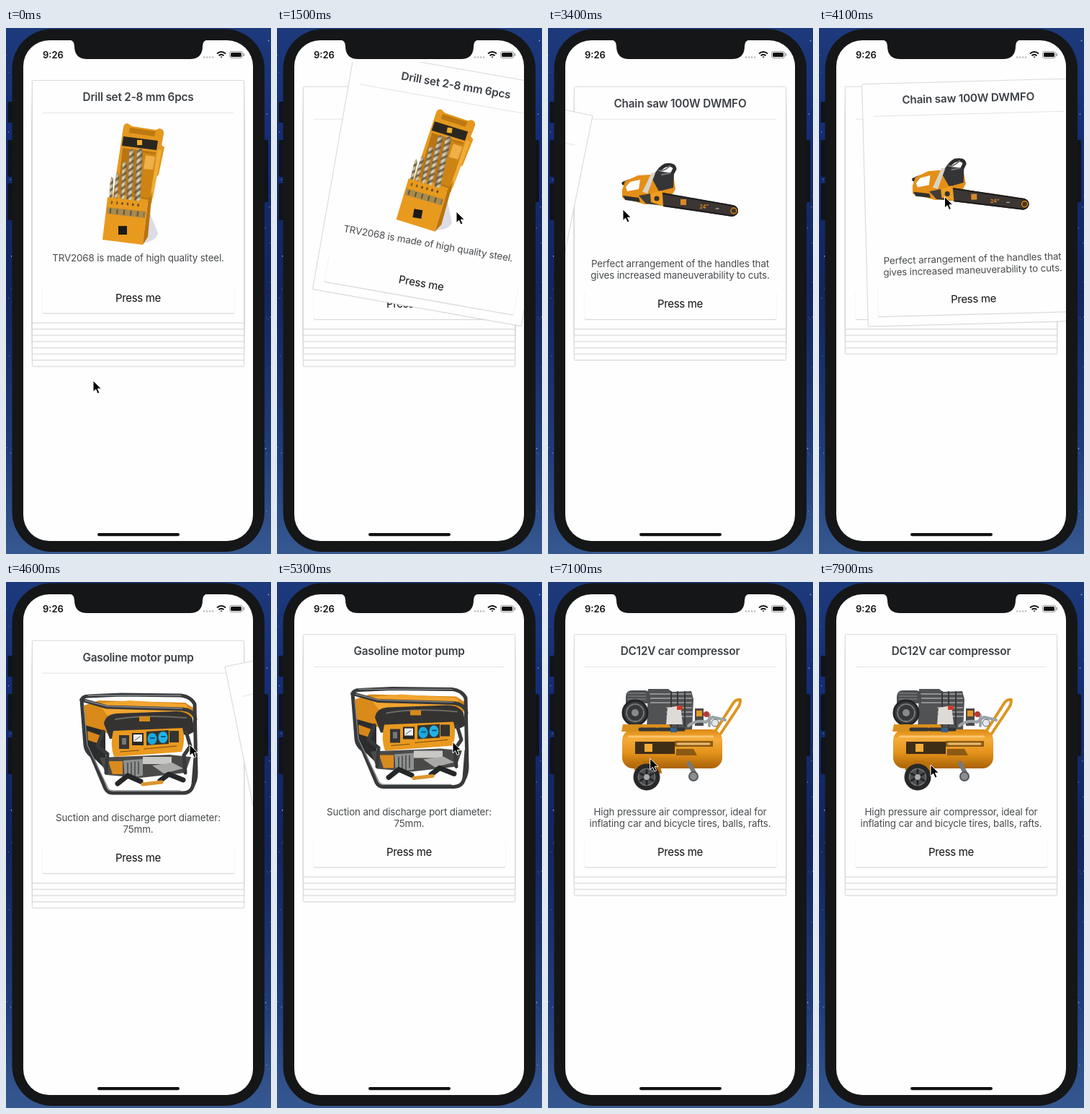
Recreate the animation shown at these times as an HTML page. Size 368 px wide and 728 px high, loop 8000 ms.

```html
<!DOCTYPE html>
<html lang="en">
<head>
<meta charset="utf-8">
<title>Card deck</title>
<style>
html, body { margin: 0; width: 100%; height: 100%; overflow: hidden; background: #12286a; }
svg { display: block; }
text { font-family: Inter, Roboto, sans-serif; text-anchor: middle; }
.title { font-size: 15.3px; font-weight: 600; letter-spacing: -.2px; fill: #3c4045; }
.body { font-size: 13.4px; letter-spacing: -.15px; fill: #484b4e; }
.press { font-size: 15px; letter-spacing: -.33px; fill: #111; }
.time { font-size: 13px; font-weight: 600; fill: #111; text-anchor: start; }
.tiny { font-size: 5px; font-weight: 700; fill: #222; }
.line { fill: none; stroke-linecap: round; stroke-linejoin: round; }
</style>
</head>
<body>
<svg width="368" height="728" viewBox="0 0 368 728">
  <defs>
    <linearGradient id="sky" x2="0" y2="1">
      <stop offset="0" stop-color="#1d3a7c"/>
      <stop offset=".2" stop-color="#142d74"/>
      <stop offset=".5" stop-color="#12255e"/>
      <stop offset=".8" stop-color="#1f3c7a"/>
      <stop offset="1" stop-color="#365890"/>
    </linearGradient>
    <linearGradient id="tank" x2="0" y2="1">
      <stop offset="0" stop-color="#dc8a12"/>
      <stop offset=".25" stop-color="#f5ab3a"/>
      <stop offset=".6" stop-color="#e3921a"/>
      <stop offset="1" stop-color="#a96208"/>
    </linearGradient>
    <linearGradient id="steel">
      <stop offset="0" stop-color="#6b5d45"/>
      <stop offset=".45" stop-color="#ded3ba"/>
      <stop offset="1" stop-color="#87754f"/>
    </linearGradient>
    <pattern id="twist" width="8" height="9" patternUnits="userSpaceOnUse" patternTransform="skewY(-35)">
      <path d="M0 0h8v4h-8z" fill="#5b4d35" opacity=".75"/>
    </pattern>
    <clipPath id="view"><path d="M24 47h319v626a36 36 0 0 1-36 36H60a36 36 0 0 1-36-36z"/></clipPath>

    <g id="drills">
      <path d="M187 298l12-44 12 30q-2 10-20 14z" fill="#dcdce6"/>
      <path d="M163 137q1-5 6-5l6 4 33 5 5-2q7 1 6 8l-3 15 4 3-8 38-4 4-6 36-54-7z" fill="#e4981f"/>
      <path d="M172 138l36 5-2 7-35-5z" fill="#bd790f"/>
      <path d="M163 150l48 6-2 13-48-6z" fill="#2b2720"/>
      <path d="M182 155h7v7h-7z" fill="#f3b02c"/>
      <path d="M162 166l46 6-9 66-44-8z" fill="#b97512"/>
      <path d="M189 172l19 3-7 61-18-3z" fill="#cd8413"/>
      <path d="M194 176l13 2-3 18-13-1z" fill="#efb04a"/>
      <path d="M211 168l5 1-12 67-4-2z" fill="#f0ad3b"/>
      <g id="bits"></g>
      <path d="M141 234l56 7-7 59-56-7z" fill="#e89a1f"/>
      <path d="M197 241l6-15-6 63-7 11z" fill="#b9730c"/>
      <path d="M141 248l53 6-1 9-53-6z" fill="#a98a4a"/>
      <path class="line" d="M144 253l48 5" stroke="#5e5340" stroke-width="7" stroke-dasharray="2 7.5" style="stroke-linecap:butt"/>
      <text class="tiny" x="165" y="245" transform="rotate(6 165 245)" style="word-spacing:3px">2 3 4 5 6 8</text>
      <path d="M156 274h12v12h-12z" fill="#1d1a15"/>
    </g>

    <g id="keys">
      <g id="wrenches" class="line"></g>
      <path fill-rule="evenodd" d="M148 167q1-12 12-12h38q12 0 13 12l-4 19-8 9h-37l-9-9zm8 2l3 12 9 5h22l9-5 4-12q-1-6-8-6h-31q-7 0-8 6z" fill="#f1a024"/>
      <path d="M153 190l52 0 3 20-13 66h-36l-12-66z" fill="#d9d7d4"/>
      <path d="M156 193l8 7v58l-6 14 37 1-6-15v-58l13-8" class="line" stroke="#aaa6a0" stroke-width="1.5"/>
      <path d="M159 261l-7 11q0 5 6 5h37q6 0 4-5l-8-11z" fill="#efa125"/>
      <path d="M166 267h22v10h-22z" fill="#dedcd8"/>
      <path d="M163 198h25v60h-25z" fill="#24201b"/>
      <path d="M166 212h19v29h-19z" fill="#e69a22"/>
      <path d="M170 216l11 20M181 216l-10 19" class="line" stroke="#3b3020" stroke-width="2"/>
      <path d="M172 201h7v7h-7z" fill="#e9ba62"/>
      <path d="M167 246h17M167 251h13" class="line" stroke="#cc9140"/>
      <path d="M260 164l-1 102" class="line" stroke="#92989d" stroke-width="7"/>
      <path d="M259 166l-1 99" class="line" stroke="#dde0e2" stroke-width="3"/>
      <g fill="#f8f8f8" stroke="#8b9094" stroke-width="3">
        <ellipse cx="260" cy="158" rx="5.5" ry="5"/><ellipse cx="258" cy="271" rx="5" ry="4.5"/>
      </g>
    </g>

    <g id="saw" transform="translate(0 -8.6)">
      <path d="M105 215q12-5 24-6M146 225q2-28 17-35 12-2 13 5l-7 13" class="line" stroke="#2c2c2d" stroke-width="5"/>
      <path d="M103 224l4-12 18-8 17-1 9 5 23-5 3 20-12 20-31 1-31-9z" fill="#e48f18"/>
      <path d="M108 220l6-7 14-3-2 13-16 3z" fill="#fff"/>
      <path d="M143 206l8-8 24 3-1 20-20 5z" fill="#353538"/>
      <path d="M126 232l28-5 6 19-24-3z" fill="#403c38"/>
      <path d="M104 232l22 3 2 6-21-3z" fill="#30302f"/>
      <path d="M131 227l13-27 5 1-11 28z" fill="#d9d3c7"/>
      <path d="M154 197q5 3 15-6M158 203l11-2" class="line" stroke="#77777b" stroke-width="2"/>
      <path d="M142 229l15-4 4 22-18-6z" fill="#ef9e20"/>
      <circle cx="151" cy="236" r="3.5" fill="#353331"/>
      <path d="M159 228l97 17q8 2 8 8t-8 8l-96-14z" fill="#3b3533"/>
      <path d="M160 229l97 17q6 2 6 7t-7 7l-95-14" class="line" stroke="#1d1b1a" stroke-width="2" stroke-dasharray="2 1.5"/>
      <circle cx="258" cy="253" r="4" fill="#453420" stroke="#d3821a" stroke-width="1.5"/>
      <path d="M184 237h8v8h-8z" fill="#d8892a"/>
      <text class="tiny" x="217" y="250" style="fill:#de8c24;font-size:7px">24"</text>
      <path d="M233 250h4" class="line" stroke="#d9d0c4"/>
    </g>

    <g id="pump" transform="translate(0 -8.6)">
      <path d="M105 172l24-8 120 3 12 8-4 28-112 8-34-12z" fill="#d98a18"/>
      <path d="M128 168l44-4 78 5 4 9-112 8z" fill="#f2a52f"/>
      <path d="M109 198l29 8v53l-27-26z" fill="#2b2c2d"/>
      <path d="M113 206l17 6v12l-16-5z" fill="#d6861a"/>
      <path d="M136 196q2-13 18-14l82-3q17 0 23 11l3 17-8 4-110 6z" fill="#343332"/>
      <path d="M152 190q40-7 98-2" class="line" stroke="#6c6963" stroke-width="2"/>
      <path d="M185 186h15v7h-15z" fill="#d68a1b"/>
      <path d="M149 206l96-4q5 15-1 33l-94 7q-6-16-1-36z" fill="#e9991f"/>
      <path d="M157 212h14v19h-14z" fill="#343536"/><path d="M161 216h6v9h-6z" fill="#777"/>
      <path d="M175 209h16v17h-16z" fill="#292929"/><path d="M177 211h12v10h-12z" fill="#eee"/>
      <path d="M179 219l7-5" class="line" stroke="#555"/>
      <path d="M195 207l31-2v19l-31 2zM227 206h13v16h-13z" fill="#353430"/>
      <ellipse cx="203" cy="217" rx="6.5" ry="8" fill="#18a9df"/>
      <ellipse cx="218" cy="215" rx="6.5" ry="8" fill="#20b3e6"/>
      <path d="M201 216h5M216 214h5" class="line" stroke="#075680" stroke-width="2"/>
      <path d="M159 235l25-2M192 231l45-4" class="line" stroke="#69420d" stroke-dasharray="2 1"/>
      <path d="M130 243l97-4 30 3-8 22-62 7-48-4z" fill="#4a4a48"/>
      <path d="M142 248h20v18h-14z" fill="#d98b20"/>
      <path d="M163 247l27-2v23l-25 4z" fill="#8f9190"/>
      <path d="M190 242h40v10h-40z" fill="#c9c8c4"/>
      <path d="M169 251v17M174 250v18M179 249v19M184 249v16" class="line" stroke="#575957" stroke-width="2"/>
      <path d="M203 254l28-4 15 8-27 7z" fill="#a9aaa8"/>
      <path d="M155 279l14-11 18 8M214 275l12-9 20 8" class="line" stroke="#252728" stroke-width="7"/>
      <path d="M190 280l26-3" class="line" stroke="#dc942c" stroke-width="5"/>
      <g class="line" stroke="#37393b" stroke-width="5">
        <path d="M105 163q2-5 9-5l46-2 83 1q14 2 19 12l2 95q0 10-4 17"/>
        <path d="M105 163l35 10 105 3q17 2 18 14"/>
        <path d="M105 163l5 63q1 9 9 15l19 45q3 6 10 6h97q13 0 15-12l3-38"/>
        <path d="M135 207l-8 20 14 11-2 26M250 207l6 20-9 13 2 24"/>
      </g>
      <path d="M114 157l129 0M110 164l31 8 104 3M108 172l5 54 28 58q2 5 9 5h92" class="line" stroke="#85898b" stroke-width="1.3"/>
    </g>

    <g id="compressor">
      <path d="M230 210l27-42q4-6 10-5 0 7-4 12l-24 36" class="line" stroke="#dc9521" stroke-width="4"/>
      <path d="M139 148h28l5 4 27-1 3 11-2 43h-63z" fill="#505254"/>
      <path d="M141 155h57M141 161h58M141 167h58M165 174h34M165 180h35M165 186h35" class="line" stroke="#8f9192" stroke-width="2"/>
      <path d="M171 152v48M180 152v48M190 152v48" class="line" stroke="#36383a" stroke-width="2"/>
      <path d="M108 159q0-9 9-9h18q7 0 7 10v8h-34z" fill="#4c4e50"/>
      <path d="M111 154h25M111 158h25M111 162h25" class="line" stroke="#8b8d8f"/>
      <circle cx="121" cy="181" r="17" fill="#37393b" stroke="#222426" stroke-width="3"/>
      <circle cx="121" cy="181" r="12" class="line" stroke="#777b7d" stroke-width="2" stroke-dasharray="6 2"/>
      <circle cx="121" cy="181" r="5" fill="#88898a"/>
      <path d="M166 174l18-3 3 26h-23z" fill="#dedbd7"/>
      <path d="M179 171h8v6h-8z" fill="#ca3d2c"/>
      <path d="M204 175h12v24h-12z" fill="#4b4948"/><path d="M206 178h8v8h-8z" fill="#e69825"/>
      <path d="M195 199q11-9 24-5l10-7 17 4M224 184v15" class="line" stroke="#9ca3a7" stroke-width="4"/>
      <circle cx="220" cy="183" r="4" fill="#b73a32"/><circle cx="232" cy="195" r="5" fill="#e6e7e8" stroke="#54616d"/>
      <rect x="103" y="204" width="139" height="54" rx="15" fill="url(#tank)"/>
      <path d="M104 197h64l5 10h-71z" fill="#d98f1c"/>
      <path d="M128 204h22M154 204h34" class="line" stroke="#343536" stroke-width="5"/>
      <path d="M170 202h9v6h-9z" fill="#38608a"/>
      <path d="M112 214h117" class="line" stroke="#fbc56c" stroke-width="3"/>
      <path d="M121 221h55v17h-55z" fill="#3f2e16"/>
      <path d="M134 224h11v11h-11z" fill="#f4ae38"/>
      <path d="M176 220h53v8h-53zM178 231h24l5 9h-29z" fill="#8c5a13"/>
      <path d="M180 224h44" class="line" stroke="#e9bd70" stroke-width="3"/>
      <path d="M196 251l7 13" class="line" stroke="#77797b" stroke-width="6"/>
      <circle cx="202" cy="269" r="6" fill="#8b8e90" stroke="#55585b" stroke-width="2"/>
      <path d="M119 260q5-13 20-13 18 1 19 18z" fill="#b9710b"/>
      <circle cx="137" cy="270" r="18.5" fill="#272829"/>
      <circle cx="137" cy="270" r="11.5" fill="#4c4e50" stroke="#777" stroke-width="1.5"/>
      <path d="M137 260v20M128 265l18 10M128 275l18-10" class="line" stroke="#252627" stroke-width="3"/>
      <circle cx="137" cy="270" r="4" fill="#aaa"/>
    </g>
  </defs>

  <rect width="368" height="728" fill="url(#sky)"/>
  <g id="stars" fill="#dbe6ff"></g>
  <g fill="#10131a">
    <rect x="2.5" y="102" width="9" height="29" rx="2"/>
    <rect x="2.5" y="155" width="9" height="51" rx="2"/>
    <rect x="2.5" y="215" width="9" height="51" rx="2"/>
    <rect x="355" y="155" width="9" height="86" rx="2"/>
  </g>
  <rect x="8.5" y="1.5" width="350.5" height="723.5" rx="55" fill="#151617"/>
  <rect x="24" y="17" width="319" height="693" rx="36" fill="#fefefe"/>
  <g id="deck" clip-path="url(#view)"></g>
  <path d="M87 16q8 1 8 9 0 18 18 18h142q18 0 18-18 0-8 8-9z" fill="#151617"/>
  <text class="time" x="51" y="41.8">9:26</text>
  <path d="M275 40.500h13" class="line" stroke="#bbb" stroke-width="2.500" stroke-dasharray="0 4"/>
  <g class="line" stroke="#111" stroke-width="2" style="stroke-linecap:butt">
    <path d="M293 35.500q6-5 12 0M295.500 38.200q3.500-3 7 0"/><path d="M297.500 39.500h3l-1.500 2z" fill="#111" stroke="none"/>
  </g>
  <rect x="310.500" y="32.500" width="18" height="9" rx="2.500" fill="none" stroke="#999"/>
  <rect x="312" y="34" width="15" height="6" rx="1.500" fill="#111"/>
  <path d="M330.300 35v4" stroke="#999" stroke-width="1.500"/>
  <rect x="127" y="699" width="114" height="4.200" rx="2.100" fill="#111"/>
  <path id="cursor" d="M0 0v15.500l3.700-3.300 2.500 5.800 2.700-1.200-2.500-5.600h5z" fill="#000" stroke="#fff"/>
</svg>
<script>
const LOOP = 8000, STEP = 100, GAP = 8.6, DECK = 8;
const $ = id => document.getElementById(id);

// swipe: [time, x, y, angle]; rise: when the deck starts to move up
const cards = [
  { art: 'drills', title: 'Drill set 2-8 mm 6pcs', body: ['TRV2068 is made of high quality steel.'],
    swipe: [[900, 0, 0, 0], [1500, 40, -18.5, 10], [1800, 340, -26, 13]], rise: 1800 },
  { art: 'keys', title: 'Set of 8 combined keys', body: ['Suitable for car repair shops or industrial', 'production.'],
    swipe: [[2700, 0, 0, 0], [3200, -150, 8, 7], [3400, -299, 16, 11.5], [3500, -375, 18, 12]], rise: 3500 },
  { art: 'saw', title: 'Chain saw 100W DWMFO', body: ['Perfect arrangement of the handles that', 'gives increased maneuverability to cuts.'],
    swipe: [[4000, 0, 0, 0], [4400, 110, 5, -6], [4600, 298, 12, -11.5], [4700, 375, 14, -12]], rise: 4700 },
  { art: 'pump', title: 'Gasoline motor pump', body: ['Suction and discharge port diameter:', '75mm.'],
    swipe: [[5400, 0, 0, 0], [5900, -165, 6, 5], [6100, -315, 12, 8], [6200, -385, 14, 10]], rise: 6200 },
  { art: 'compressor', title: 'DC12V car compressor', body: ['High pressure air compressor, ideal for', 'inflating car and bicycle tires, balls, rafts.'] }
];

const pointer = [
  [0, 121, 488], [300, 121, 488], [700, 198, 290], [900, 209, 272], [1500, 249, 254],
  [1700, 285, 252], [2100, 275, 253], [2500, 267, 254], [2700, 258, 252], [3200, 110, 250],
  [3400, 104, 251], [4000, 150, 236], [4400, 248, 226], [4600, 255, 225], [5100, 252, 224],
  [5400, 240, 220], [5900, 100, 208], [6100, 97, 207], [7000, 140, 243], [7900, 155, 253]
];

function at(keys, t) {
  const next = keys.findIndex(k => k[0] > t);
  if (next === 0) return keys[0].slice(1);
  if (next < 0) return keys[keys.length - 1].slice(1);
  const a = keys[next - 1], b = keys[next];
  const p = (t - a[0]) / (b[0] - a[0]);
  return a.slice(1).map((v, i) => v + (b[i + 1] - v) * p);
}

const easeOut = p => 1 - (1 - Math.min(1, Math.max(0, p))) ** 3;

function face({ art, title, body }) {
  const lines = body.map((s, i) => `<text class="body" x="183.500" y="${322.5 + 16 * i}">${s}</text>`).join('');
  return `<text class="title" x="183.500" y="101">${title}</text>
    <path d="M51 117.500h265" stroke="#e3e3e4"/>
    <use href="#${art}"/>${lines}
    <rect x="50.500" y="356" width="267" height="40" rx="2" fill="#000" opacity=".06"/>
    <rect x="51" y="356" width="266" height="39.500" rx="2" fill="#d9d9da"/>
    <rect x="51" y="355" width="266" height="39.500" rx="2" fill="#fefefe"/>
    <text class="press" x="183.500" y="378.800">Press me</text>`;
}

function build() {
  for (let i = 0; i < DECK; i++) {
    const g = document.createElementNS('http://www.w3.org/2000/svg', 'g');
    g.innerHTML = `<rect x="35.500" y="72" width="296" height="337.500" rx="2" fill="#000" opacity=".045"/>
      <rect x="36.500" y="72.500" width="294" height="335.500" rx="1" fill="#fefefe" stroke="#d9dadd"/>`
      + (cards[i] ? face(cards[i]) : '');
    $('deck').prepend(g);
    (cards[i] ||= {}).node = g;
  }

  // drill bits: foot x, head x, head y, width
  $('bits').innerHTML = [[143, 147, 206, 4], [149, 155, 200, 5], [158, 165, 184, 6], [167, 175, 167, 7], [178, 186, 166, 8]]
    .map(([x, hx, y, w]) => {
      const d = `M${x} 246L${hx - w / 2} ${y + 3}l${w / 2}-3 ${w / 2} 3L${x + w} 246z`;
      return `<path d="${d}" fill="url(#steel)"/><path d="${d}" fill="url(#twist)"/>`;
    }).join('');

  let wrenches = '';
  for (let i = 0; i < 8; i++) {
    const lx = 109 + i * i * .5, ly = 194 + i * 8.6, rx = 244 - i * i * .45, ry = 212 + i * 7;
    const d = `M${lx} ${ly}q10-2 17 5t16 6L180 ${214 + i * 6}L215 ${207 + i * 7.5}q7-4 13 2T${rx} ${ry}`;
    const w = 4.5 - i * .3;
    wrenches += `<path d="${d}" stroke="#62676b" stroke-width="${w}"/><path d="${d}" stroke="#c9cdd0" stroke-width="${w / 2.5}"/>`
      + [[lx, ly], [rx, ry]].map(([x, y]) =>
        `<ellipse cx="${x}" cy="${y}" rx="${w}" ry="${w * .7}" fill="#d8dadb" stroke="#63686c" stroke-width="1.500"/>`).join('');
  }
  $('wrenches').innerHTML = wrenches;

  let seed = 11, dots = '';
  const rand = () => (seed = seed * 16807 % 2147483647) / 2147483647;
  for (let i = 0; i < 44; i++) {
    const x = rand() * 9 + (i % 2 ? 359 : 0);
    dots += `<circle cx="${x}" cy="${rand() * 728}" r="${.3 + rand() * .6}" opacity="${.2 + rand() * .6}"/>`;
  }
  $('stars').innerHTML = dots;
}

function draw(t) {
  const risen = cards.reduce((n, c) => n + (c.rise ? easeOut((t - c.rise) / 300) : 0), 0);
  cards.forEach((c, i) => {
    const [x, y, angle] = c.swipe ? at(c.swipe, t) : [0, 0, 0];
    const drop = c.swipe && t >= c.swipe[0][0] ? 0 : Math.max(0, i - risen) * GAP;
    c.node.setAttribute('transform', `translate(${x} ${y + drop}) rotate(${angle} 183.5 240)`);
    c.node.style.display = c.rise && t >= c.rise ? 'none' : '';
  });
  $('cursor').setAttribute('transform', `translate(${at(pointer, t).join(' ')})`);
}

build();
const start = performance.now();
function tick() {
  const t = (performance.now() - start) % LOOP;
  draw(Math.floor(t / STEP) * STEP);
  requestAnimationFrame(tick);
}
tick();
</script>
</body>
</html>
```
